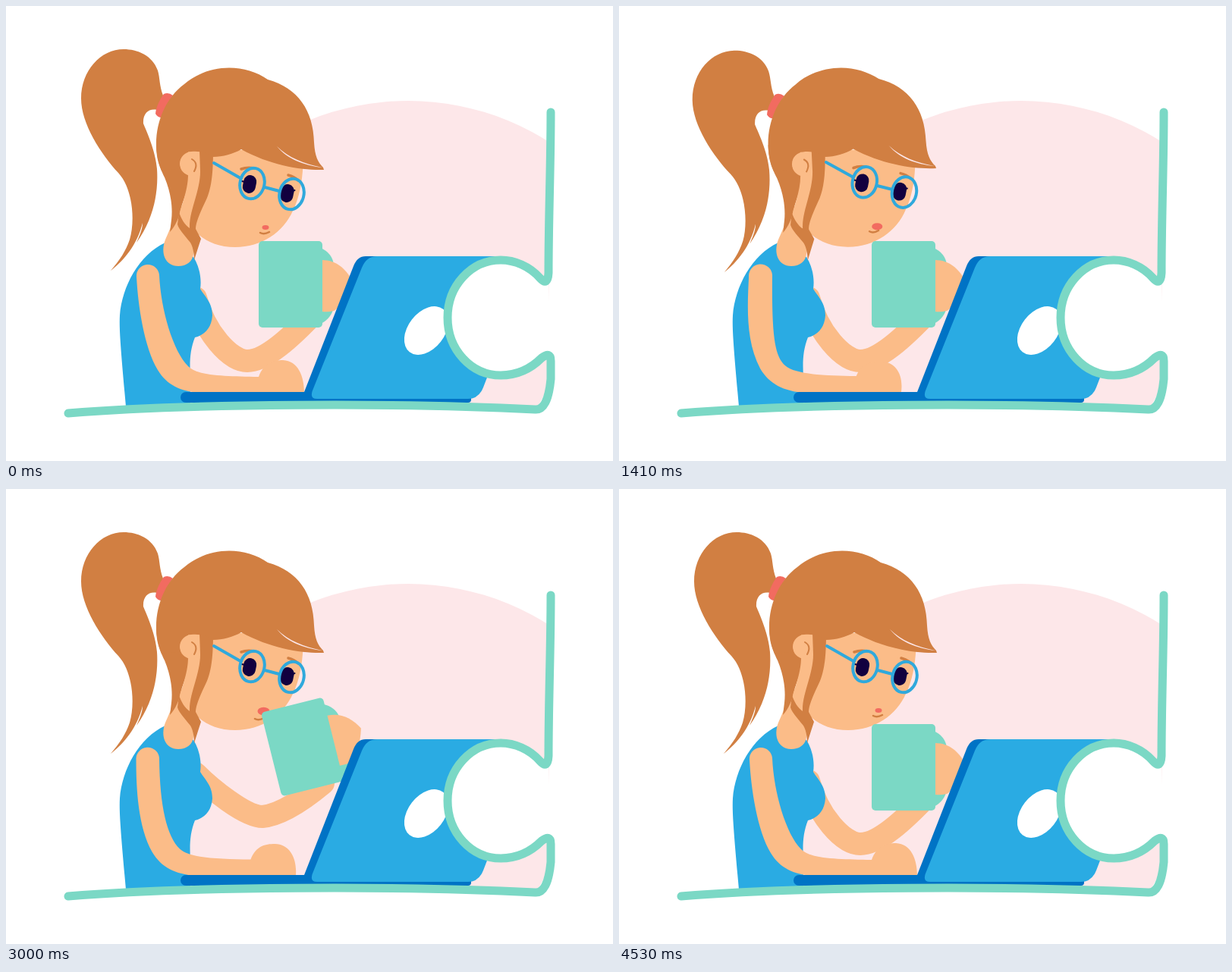
Animation of 800 by 600 pixels, one loop 4.56 s. Source, as an HTML page:

```html
<!DOCTYPE html>
<html lang="en">
<head>
<meta charset="utf-8">
<title>Coffee at the laptop</title>
<style>
  html, body { margin: 0; height: 100%; overflow: hidden; background: #fff; }
  svg { display: block; width: 100vw; height: 100vh; }
  .hair { fill: #d17f42; }
  .skin { fill: #fbbc88; }
  .blue { fill: #2aabe3; }
  .navy { fill: #0073c5; }
  .pink { fill: #fde7e9; }
  .teal { fill: #7bd8c5; }
  .red { fill: #f26b60; }
  .ink { fill: #12003f; }
  .line { fill: none; stroke-linecap: round; stroke-linejoin: round; }
  .glasses { stroke: #2fa9dc; stroke-width: 4; }
  .brown { stroke: #d17f42; }
</style>
</head>
<body>
<svg viewBox="0 0 800 600">
  <clipPath id="piece"><path d="M0 0H716V500L700 530H0Z"/></clipPath>
  <circle class="pink" cx="530" cy="470" r="345" clip-path="url(#piece)"/>

  <path id="backArm" class="line" stroke="#fbbc88" stroke-width="30"/>

  <g id="body">
    <path class="blue" d="M158 528C151 450 149 425 150 408C153 370 175 328 210 312L247 331C255 343 258 360 256 373C262 383 272 391 272 408C271 424 262 434 249 437C242 455 242 470 243 490V528Z"/>
    <path class="skin" d="M230 262L210 308C203 326 210 343 227 343C238 343 246 337 247 327L254 290Z"/>
  </g>

  <g id="head">
    <path class="hair" d="M207 118C202 105 203 95 200 85C193 65 173 57 155 57C125 57 99 85 99 122C99 155 125 195 148 220C168 242 170 285 163 308C158 323 150 335 138 349C155 336 173 315 180 286C180 295 175 305 172 312C195 280 201 245 199 215C197 190 185 165 181 155C180 140 190 133 203 138Z"/>
    <path class="red" d="M208 116Q214 113 220 118C214 126 210 135 207 147Q200 148 197 142C198 132 203 123 208 116Z"/>
    <path class="hair" d="M198 182C198 205 204 215 209 226C217 245 220 265 218 282L216 298C223 290 228 280 230 268L245 224L260 180Z"/>
    <path class="skin" d="M240 190H392C392 225 388 250 378 270C366 298 337 318 302 318C280 318 262 310 250 298L228 276C234 255 240 240 240 222Z"/>
    <circle class="skin" cx="245" cy="208" r="16"/>
    <path class="line brown" stroke-width="2" d="M245 202Q254 207 248 218"/>
    <path class="hair" d="M255 190H273C273 220 271 238 265 253C256 272 250 285 250 294L257 307L248 335C248 325 246 317 243 312C236 303 228 295 226 288L228 272C231 281 236 289 242 293C241 270 256 245 256 218Z"/>
    <path class="hair" d="M198 182C198 150 212 120 235 103C268 75 315 76 345 97C385 108 405 138 406 180C407 198 411 206 418 213L419 216C392 217 350 211 310 189C300 195 285 199 273 199C262 192 252 191 244 192C232 192 226 202 230 215L205 217Q198 200 198 182Z"/>
    <path class="pink" d="M357 185C371 202 392 210 417 213C393 208 372 200 357 185Z"/>
    <g id="face">
      <path class="line brown" stroke-width="3.5" d="M310 215Q318 212 327 214M372 223Q380 225 385 230"/>
      <g id="eyes"></g>
      <g class="line glasses">
        <path d="M274 207L309 227M341 239L360 244"/>
        <ellipse cx="324.5" cy="234" rx="16" ry="20.5" transform="rotate(14 324.5 234)"/>
        <ellipse cx="376.5" cy="248" rx="16" ry="20.5" transform="rotate(14 376.5 248)"/>
      </g>
      <ellipse id="lips" class="red"/>
      <path id="smile" class="line brown" stroke-width="2.5" d="M335 299Q340 302 347 298"/>
    </g>
  </g>

  <g id="mug">
    <path class="teal" d="M415 319Q430 326 432 341V396Q430 411 415 419Z"/>
    <rect class="teal" x="333" y="310" width="84" height="114" rx="5"/>
    <path class="skin" d="M417 335C434 335 448 346 456 362C451 380 441 397 432 402Q424 404 417 403Z"/>
  </g>

  <path id="frontArm" class="skin"/>

  <path class="navy" d="M237 509H393L458 343Q463 330 474 330H580V523H237A7 7 0 0 1 237 509ZM560 509H613V519Q613 523 609 523H560Z"/>
  <path class="blue" d="M404 507L469 345Q475 330 489 330H652L634 490L629 503Q623 518 609 518H410Q400 518 404 507Z"/>
  <ellipse cx="554" cy="428" rx="24" ry="36" fill="#fff" transform="rotate(38 554 428)"/>
  <path fill="#fff" d="M715 352Q714 370 704 359C690 343 670 335 652 335C613 335 582 369 582 411C582 453 613 487 652 487C673 487 692 478 706 464Q718 455 718 468Z"/>
  <path class="line" stroke="#7bd8c5" stroke-width="11" d="M718 140C718 210 715 280 715 352Q714 370 704 359C690 343 670 335 652 335C613 335 582 369 582 411C582 453 613 487 652 487C673 487 692 478 706 464Q718 455 718 468L718 492Q714 534 697 532C520 523 240 524 82 537"/>
</svg>
<script>
const LOOP = 4560;
const $ = id => document.getElementById(id);
const set = (el, attrs) => Object.entries(attrs).forEach(([k, v]) => el.setAttribute(k, v));

// Keys are [time, value]; cosine easing between neighbours.
const headKeys = [[800, 0], [1740, 1], [1790, 1], [2230, 0]];
const mugKeys = [[1950, 0], [2650, 1], [3150, 1], [3830, 0]];
const blinkKeys = [[3690, 0], [3810, 1], [3870, 1], [3990, 0]];
const handKeys = [[0, 0], [1110, .86], [1770, 1], [2280, .22], [3000, .48], [3840, .72], [4530, 0]];

const armOut = "M172 357A15 15 0 0 1 202 355C204 400 220 455 240 475C252 488 290 488 333 489C340 470 352 467 365 467C385 468 393 488 393 510L255 510C230 508 212 500 200 480C182 450 174 395 172 357Z";
const armIn = "M171 357A15 15 0 0 1 202 355C201 440 204 462 217 474C232 487 275 487 311 488C318 471 330 469 343 469C362 469 374 485 370 510L245 510C215 508 197 498 185 478C165 440 169 395 171 357Z";
const elbowLow = "M250 385C262 430 295 468 318 468C342 468 375 438 409 402";
const elbowHigh = "M250 375C270 395 315 432 338 432C362 430 394 408 418 388";

function track(keys, t) {
  if (t <= keys[0][0]) return keys[0][1];
  for (let i = 1; i < keys.length; i++) {
    const [t0, a] = keys[i - 1], [t1, b] = keys[i];
    if (t < t1) return a + (b - a) * (1 - Math.cos(Math.PI * (t - t0) / (t1 - t0))) / 2;
  }
  return keys[keys.length - 1][1];
}

function mixPath(a, b, k) {
  const ends = b.match(/\d+/g);
  let i = 0;
  return a.replace(/\d+/g, n => +n + (ends[i++] - n) * k);
}

function eye(x, y, side, shut) {
  const w = 17 - 11 * shut, h = 24 - 16 * shut;
  const lash = `M${x + side * 10} ${y - 4 + 5 * shut}q${-side * 5} ${2 + 3 * shut} ${-side * 10} ${2 * shut}`;
  return `<rect class="ink" x="${x - w / 2}" y="${y - h / 2}" width="${w}" height="${h}" rx="${w / 2}" transform="rotate(12 ${x} ${y})"/>
    <path class="line" stroke="#12003f" stroke-width="${2 + shut}" d="${lash}"/>`;
}

function draw(t) {
  const head = track(headKeys, t), sip = track(mugKeys, t);
  const blink = track(blinkKeys, t), mouth = Math.max(head, sip);
  set($("head"), { transform: `rotate(${-1.1 * head} 280 285)` });
  set($("face"), { transform: `translate(0 ${-1.5 * head})` });
  set($("lips"), { cx: 342 - 2.5 * mouth, cy: 292 + mouth, rx: 4.5 + 3.5 * mouth, ry: 3 + 2.2 * mouth });
  set($("smile"), { transform: `translate(${-7 * mouth} ${4 * sip})` });
  set($("mug"), { transform: `translate(${15.5 * sip} ${-27 * sip}) rotate(${-14 * sip} 375 367)` });
  set($("backArm"), { d: mixPath(elbowLow, elbowHigh, sip) });
  set($("frontArm"), { d: mixPath(armOut, armIn, track(handKeys, t)) });
  $("eyes").innerHTML = eye(321, 235, -1, blink) + eye(370.5, 247, 1, blink);
}

const start = performance.now();
function tick() {
  draw((performance.now() - start) % LOOP);
  requestAnimationFrame(tick);
}
tick();
</script>
</body>
</html>
```
